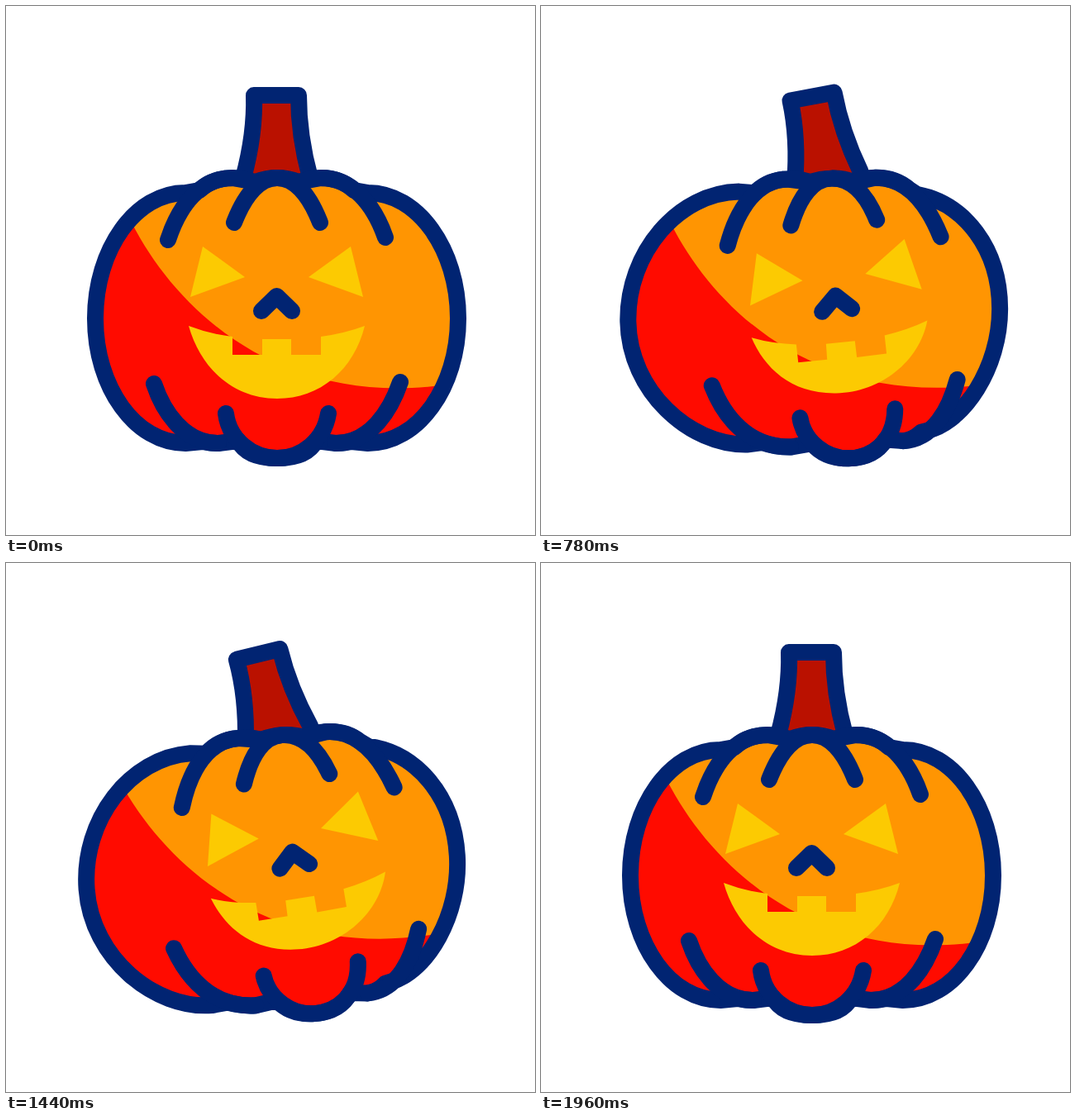
These frames come from a looping animation (640 px wide and 640 px high, 2400 ms). An HTML page:

```html
<!DOCTYPE html>
<html>
<head>
<meta charset="utf-8">
<style>
html, body { margin: 0; height: 100%; overflow: hidden; background: #fff }
svg { display: block; width: 100vw; height: 100vh }
.line { fill: none; stroke: #012472; stroke-width: 20; stroke-linecap: round; stroke-linejoin: round }
</style>
</head>
<body>
<svg viewBox="0 0 640 640">
  <clipPath id="clip"><path data-shape="body"/></clipPath>
  <g id="all">
    <g id="stem">
      <path class="line" style="fill:#ba1100" d="M287 208C296 175 301 140 300 108H354C354 140 359 175 368 208"/>
    </g>
    <path data-shape="body" fill="#ff9502"/>
    <path data-shape="shade" fill="#ff0b00" clip-path="url(#clip)"/>
    <path data-shape="face" fill="#fcca02"/>
    <path data-shape="body" class="line"/>
    <path data-shape="folds" class="line"/>
    <path id="rays" class="line" style="stroke:#ff1000"/>
  </g>
</svg>
<script>
// Each shape: upright pose, then turned pose
const shapes = {
  body: [
    'M217 226C157 226 108 294 108 378S157 529 217 529L238 527Q247 529 257 529L281 526Q292 547 328 547Q364 547 375 526L399 529Q409 529 418 527L438 529C498 529 547 462 547 378S498 226 438 226L421 223Q405 208 381 208L354 213Q342 208 328 208Q314 208 302 213L274 208Q250 208 234 223Z',
    'M245 223C172 223 108 294 108 378S180 529 249 529L268 527Q285 533 302 533L328 529Q343 548 372 548Q403 548 417 526L438 528Q450 527 460 518L468 516C511 507 557 442 558 370S518 242 460 230L451 224Q435 209 410 209L384 214Q372 209 357 209Q344 209 331 213L304 209Q280 209 264 225Z'],
  shade: [
    'M146 250C200 365 330 490 540 457L600 600L60 600L60 250Z',
    'M158 252C210 365 335 490 550 460L600 600L60 600L60 250Z'],
  face: [
    'M238 291L289 328L223 352ZM417 291L366 328L432 352ZM221 387Q247 397 274 400L274 422L310 422L310 403L345 403L345 422L381 422L381 400Q410 396 434 387C421 440 380 475 328 475S236 440 221 387Z',
    'M265 298L320 332L256 361ZM444 284L396 325L464 345ZM257 400Q283 408 311 409L313 431L348 428L347 409L382 406L384 426L420 422L418 400Q446 394 470 383C460 432 412 469 358 469S272 437 257 400Z'],
  folds: [
    'M276 262C290 226 308 208 328 208S366 226 380 262M196 283C210 240 236 208 274 208Q290 208 303 215M459 280C445 240 419 208 381 208Q365 208 352 215M179 457C190 490 215 529 257 529M477 455C465 490 440 529 399 529M266 493C270 525 298 547 328 547S385 525 390 493M309 369L327.5 351L346 369',
    'M307 265C318 230 335 209 357 209S398 226 411 260M230 288C243 242 268 209 304 209Q320 208 333 214M488 282C472 240 447 209 410 209Q394 209 381 215M208 457C222 495 250 532 302 533M505 455C495 490 475 527 438 528M314 498C318 527 345 548 372 548S428 530 429 489M343 370L359.5 351L379 367']
};
// Inner and outer end of the left rays; the right ones mirror them
const rays = [[114, 218, 84, 199], [142, 191, 127, 160]];

const all = document.getElementById('all');
const stem = document.getElementById('stem');
const rayPath = document.getElementById('rays');
const number = /\d+(\.\d+)?/g;
const mix = (a, b, k) => a + (b - a) * k;

function ease(t, from, to) {
  const p = Math.min(1, Math.max(0, (t - from) / (to - from)));
  return (1 - Math.cos(Math.PI * p)) / 2;
}

function morph([a, b], k) {
  const ends = b.match(number);
  let i = 0;
  return a.replace(number, n => mix(+n, +ends[i++], k).toFixed(2));
}

function rayLines(t) {
  const p = (t - (t < 1000 ? 110 : 1615)) / 330;
  if (p <= 0 || p >= 1) return '';
  const tail = ease(p, .35, 1), head = ease(p, 0, .55);
  return rays.map(([x, y, X, Y]) => {
    const x1 = mix(x, X, tail), y1 = mix(y, Y, tail);
    const x2 = mix(x, X, head), y2 = mix(y, Y, head);
    return `M${x1} ${y1}L${x2} ${y2}M${644 - x1} ${y1}L${644 - x2} ${y2}`;
  }).join('');
}

function draw(now) {
  const t = Math.floor(now % 2400 / 20) * 20;
  const turn = ease(t, 110, 450) - ease(t, 1540, 1860);
  const lean = 4.2 * (ease(t, 420, 1520) - ease(t, 1640, 1860));
  const tilt = 9.5 * (ease(t, 110, 400) - ease(t, 1600, 1900));
  for (const path of document.querySelectorAll('[data-shape]'))
    path.setAttribute('d', morph(shapes[path.dataset.shape], turn));
  all.setAttribute('transform', `rotate(${-lean} 333 530)`);
  stem.setAttribute('transform', `translate(${25 * turn}) rotate(${-tilt} 328 208)`);
  rayPath.setAttribute('d', rayLines(t));
}

const start = performance.now();
function loop() {
  draw(performance.now() - start);
  requestAnimationFrame(loop);
}
loop();
</script>
</body>
</html>
```
